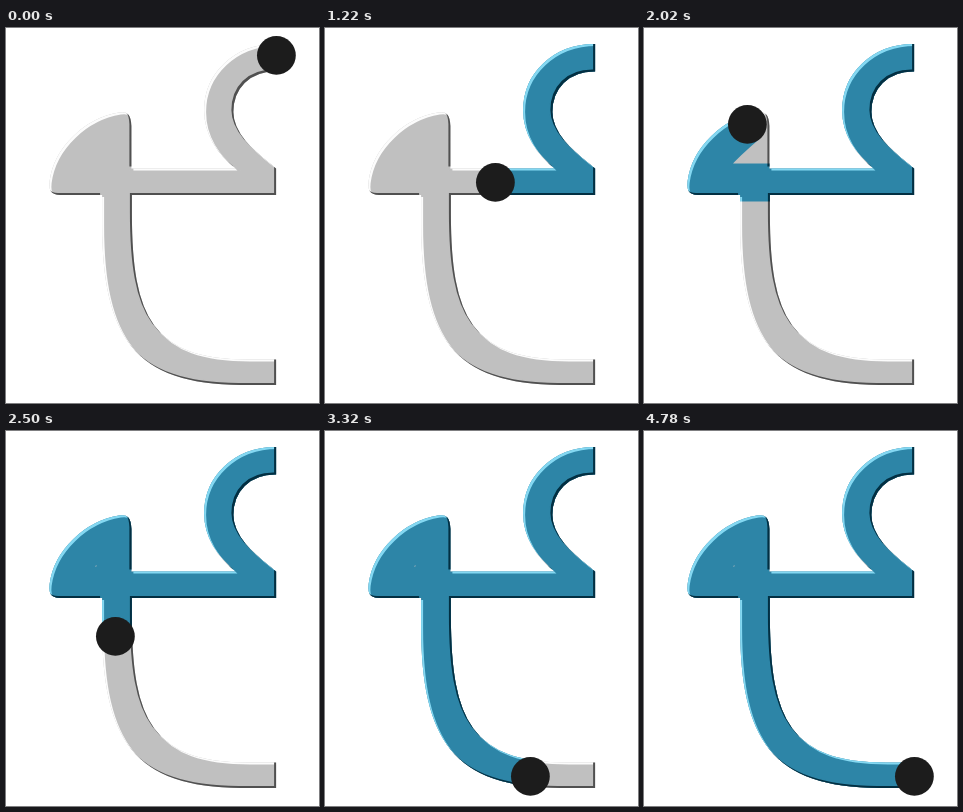
An HTML page that plays this animation: 313x375 px, repeating every 4.8 s.

```html
<!DOCTYPE html>
<html lang="en">
<head>
<meta charset="utf-8">
<title>Letter stroke</title>
<style>
  html, body { margin: 0; width: 100%; height: 100%; overflow: hidden; background: #fff; }
  svg { display: block; width: 100vw; height: 100vh; }
  filter { color-interpolation-filters: sRGB; }
</style>
</head>
<body>
<svg viewBox="0 0 313 375">
  <defs>
    <path id="glyph" stroke-width="1.800" d="M269.200 17C229 17 199 46 199 82C199 106 211 124 232 141.500
      H124.500V98C124 87 121 84 113 85.500C80 91 49 119 44.500 153C43.500 163 46 166 54 166
      H97V195C97 308 129 356 235 356H269.200V332.500H242C146 332.500 125 290 125 185V166
      H269.200V141C251 126 226.500 108 226.500 84C226.500 60 243 42.500 269.200 42.500Z"/>
    <filter id="greyBevel" x="-5%" y="-5%" width="110%" height="110%">
      <feGaussianBlur in="SourceAlpha" stdDeviation=".7" result="soft"/>
      <feOffset in="soft" dx="1.800" dy="1.800" result="down"/>
      <feOffset in="soft" dx="-1.600" dy="-1.600" result="up"/>
      <feFlood flood-color="#fcfcfc"/>
      <feComposite in2="SourceAlpha" operator="in"/>
      <feComposite in2="down" operator="out" result="light"/>
      <feFlood flood-color="#505050"/>
      <feComposite in2="SourceAlpha" operator="in"/>
      <feComposite in2="up" operator="out" result="dark"/>
      <feMerge>
        <feMergeNode in="SourceGraphic"/><feMergeNode in="light"/><feMergeNode in="dark"/>
      </feMerge>
    </filter>
    <filter id="blueBevel" x="-5%" y="-5%" width="110%" height="110%">
      <feGaussianBlur in="SourceAlpha" stdDeviation=".7" result="soft"/>
      <feOffset in="soft" dx="1.800" dy="1.800" result="down"/>
      <feOffset in="soft" dx="-1.600" dy="-1.600" result="up"/>
      <feFlood flood-color="#84d8f2"/>
      <feComposite in2="SourceAlpha" operator="in"/>
      <feComposite in2="down" operator="out" result="light"/>
      <feFlood flood-color="#022f42"/>
      <feComposite in2="SourceAlpha" operator="in"/>
      <feComposite in2="up" operator="out" result="dark"/>
      <feMerge>
        <feMergeNode in="SourceGraphic"/><feMergeNode in="light"/><feMergeNode in="dark"/>
      </feMerge>
    </filter>
    <mask id="reveal" maskUnits="userSpaceOnUse" x="0" y="0" width="313" height="375">
      <g fill="none" stroke="#fff" stroke-linejoin="round">
        <path id="arc" pathLength="1" stroke-width="31"
          d="M271 29.500C236 29.500 213 53 213 83C213 108 234 126 264 147"/>
        <path id="rest" stroke-width="38"/>
      </g>
    </mask>
  </defs>
  <use href="#glyph" fill="#c0c0c0" stroke="#c0c0c0" filter="url(#greyBevel)"/>
  <g mask="url(#reveal)">
    <use href="#glyph" fill="#2d85a7" stroke="#2d85a7" filter="url(#blueBevel)"/>
  </g>
  <circle id="dot" r="19.400" fill="#1c1c1c"/>
</svg>
<script>
  const LOOP = 4800, STEP = 20;
  // Each leg of the pen's route, with the time it is finished.
  const legs = [
    ['M270.400 27.400', 0],
    ['C238 27 212 48 212 82C212 110 238 132 263.400 151.400', 760],
    ['L269.500 154.400H170.400', 1220],
    ['H55C56 140 78 118 103.400 96.400', 2020],
    ['L109.400 92V205.400', 2500],
    ['C109.400 295 142 338 205.400 345.400', 3320],
    ['H270.400', 3610]
  ];
  const [arc, rest, dot] = ['arc', 'rest', 'dot'].map(id => document.getElementById(id));
  const pen = document.createElementNS('http://www.w3.org/2000/svg', 'path');

  let route = '';
  const keys = legs.map(([d, time]) => {
    route += d;
    pen.setAttribute('d', route);
    return { time, length: pen.getTotalLength() };
  });
  const total = keys[keys.length - 1].length;
  const arcLength = keys[1].length;
  rest.setAttribute('d', 'M263.400 151.400' + legs.slice(2).map(([d]) => d).join(''));

  function travelled(t) {
    const i = keys.findIndex(k => k.time > t);
    if (i < 0) return total;
    const a = keys[i - 1], b = keys[i];
    return a.length + (b.length - a.length) * (t - a.time) / (b.time - a.time);
  }

  function draw() {
    const t = Math.floor(performance.now() % LOOP / STEP) * STEP;
    const s = travelled(t);
    const p = pen.getPointAtLength(s);
    arc.setAttribute('stroke-dasharray', `${Math.min(1, s / arcLength)} 2`);
    rest.setAttribute('stroke-dasharray', `${Math.max(0, s - arcLength)} ${total}`);
    dot.setAttribute('cx', p.x);
    dot.setAttribute('cy', p.y);
    requestAnimationFrame(draw);
  }
  draw();
</script>
</body>
</html>
```
